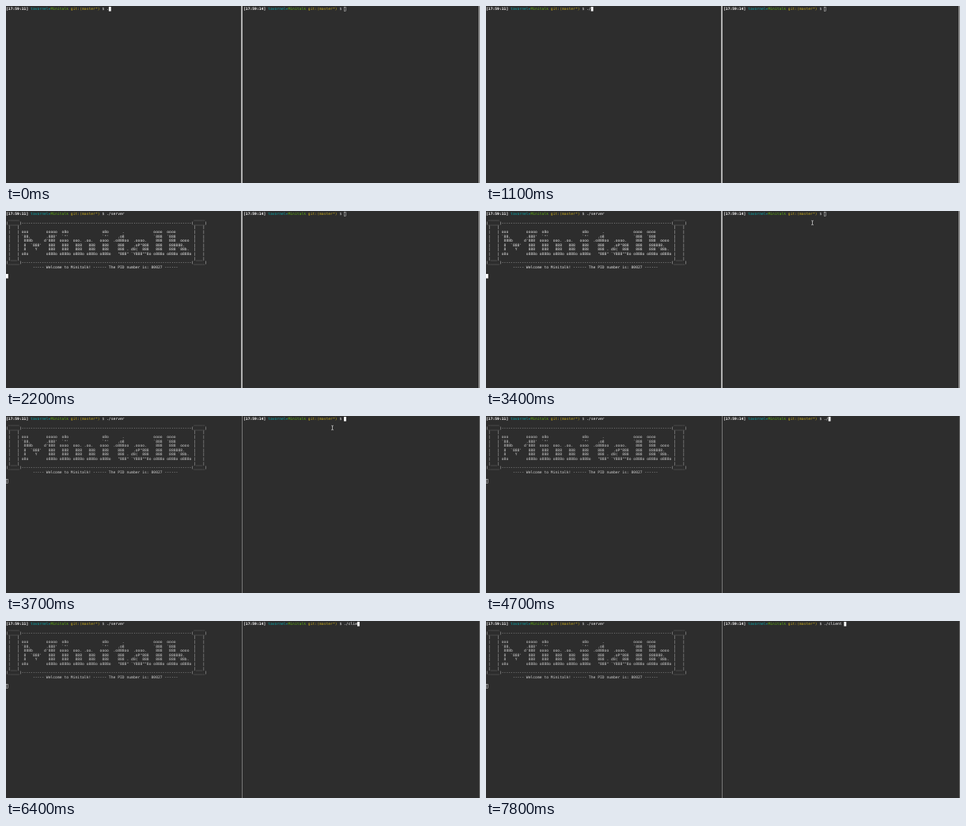
An HTML page for the animation above (8 s loop, 599 by 225 pixels).

```html
<!DOCTYPE html>
<html lang="en">
<head>
<meta charset="utf-8">
<title>Minitalk terminal</title>
<style>
  html, body { margin: 0; width: 599px; height: 225px; overflow: hidden; background: #2d2d2d; }
  body { position: relative; }
  /* Terminals are laid out at ten times their size and scaled down for exact cell widths. */
  .term {
    position: absolute; top: .9px; width: 2960px; height: 2230px;
    transform: scale(.1); transform-origin: 0 0;
    font: 46.9px/56.4px "DejaVu Sans Mono", monospace;
    text-rendering: geometricPrecision; font-variant-ligatures: none;
    color: #e4e4e4; white-space: pre;
  }
  #left { left: 0; }
  #right { left: 300px; }
  .term.idle { color: #cfcfcf; }
  pre { margin: 0; font: inherit; }
  .time { color: #fff; font-weight: bold; }
  .user { color: #0aa5a8; }
  .dir { color: #5fae10; }
  .git { color: #c4a81c; }
  .cmd { color: #fff; }
  .cursor { position: absolute; left: 0; top: 0; width: 1ch; height: 56.4px; box-sizing: border-box; }
  .cursor.on { background: #fff; }
  .cursor.hollow { border: 5px solid #d8d8d8; }
  .bar { position: absolute; top: 0; height: 225px; }
  #mid { left: 297px; width: 2px; background: #b2b2b2; }
  #edge { left: 597px; width: 2px; background: #8c8c8c; }
  #midLine { left: 297.5px; width: 1px; background: #777; }
  #edgeLine { left: 598px; width: 1px; background: #666; }
  #pointer { position: absolute; left: 0; top: 0; width: 4px; height: 7px; }
</style>
</head>
<body>
<div class="term" id="left"><div><span class="time">[17:59:11]</span> <span class="user">tavornel▸</span><span class="dir">Minitalk</span> <span class="git">git:(master*)</span> $ <span class="cmd"></span></div><pre id="banner">
ooo        ooooo  o8o               o8o      .             oooo  oooo
`88.       .888'  `"'               `"'    .o8             `888  `888
 888b     d'888  oooo  ooo. .oo.   oooo  .o888oo  .oooo.    888   888  oooo
 8  `888'   888   888   888   888   888    888    .oP"888   888   888888.
 8    Y     888   888   888   888   888    888 . d8(  888   888   888 `88b.
o8o        o888o o888o o888o o888o o888o   "888" `Y888""8o o888o o888o o888o</pre><i class="cursor"></i></div>
<div class="term" id="right"><div><span class="time">[17:59:14]</span> <span class="user">tavornel▸</span><span class="dir">Minitalk</span> <span class="git">git:(master*)</span> $ <span class="cmd"></span></div><i class="cursor"></i></div>
<div class="bar" id="midLine"></div>
<div class="bar" id="edgeLine"></div>
<div class="bar" id="mid"></div>
<div class="bar" id="edge"></div>
<svg id="pointer" viewBox="0 0 4 7"><path d="M.6 .5Q2 .5 2 1.2Q2 .5 3.4 .5M2 1.2V5.6M.6 6.3Q2 6.3 2 5.6Q2 6.3 3.4 6.3" fill="none" stroke="#e0e0e0" stroke-width=".7"/></svg>
<script>
const LOOP = 8000, PROMPT_COLS = 45, ROW = 56.4;
const START = 2200, FOCUS = 3500;
const $ = id => document.getElementById(id);

function frameBanner(art) {
  const wide = 76, gap = ' '.repeat(wide);
  const wrap = (side, line) => side + line.padEnd(wide) + side;
  const rule = wrap('(_____)', '-'.repeat(wide));
  return [
    wrap(' _____ ', gap), rule, wrap(' |   | ', gap),
    ...art.split('\n').map(line => wrap(' |   | ', line)),
    wrap(' |___| ', gap), rule,
    ' '.repeat(12) + '----- Welcome to Minitalk! ------ The PID number is: 80027 ------'
  ].join('\n');
}
const banner = $('banner');
banner.textContent = frameBanner(banner.textContent.replace(/^\n/, ''));

// Each step: start time, typed characters, cursor state, cursor row.
const panes = [
  { id: 'left', text: './server ', steps: [
    [0, 1, 'on'], [600, 1, 'off'], [1100, 2, 'on'], [1300, 3, 'on'], [1400, 4, 'on'],
    [1600, 5, 'on'], [1700, 9, 'on'], [START, 9, 'on', 14], [2700, 9, 'off', 14],
    [3300, 9, 'on', 14], [FOCUS, 9, 'hollow', 14]] },
  { id: 'right', text: './client ', steps: [
    [0, 0, 'hollow'], [FOCUS, 0, 'on'], [4100, 0, 'off'], [4300, 1, 'on'], [4700, 2, 'on'],
    [4900, 3, 'on'], [5500, 3, 'off'], [6100, 4, 'on'], [6300, 5, 'on'], [6400, 6, 'on'],
    [6500, 7, 'on'], [6600, 8, 'on'], [6700, 9, 'on'], [7200, 9, 'off'], [7800, 9, 'on']] }
];
for (const pane of panes) {
  pane.el = $(pane.id);
  pane.cmd = pane.el.querySelector('.cmd');
  pane.cursor = pane.el.querySelector('.cursor');
}

function drawPane(pane, t) {
  const step = pane.steps.findLast(s => s[0] <= t);
  if (step === pane.last) return;
  pane.last = step;
  const [, typed, state, row = 0] = step;
  pane.cmd.textContent = pane.text.slice(0, typed);
  pane.cursor.className = 'cursor ' + state;
  pane.cursor.style.left = (row ? 0 : PROMPT_COLS + typed) + 'ch';
  pane.cursor.style.top = row * ROW + 'px';
  pane.el.classList.toggle('idle', state === 'hollow');
}

function drawPointer(t) {
  const p = Math.min(1, Math.floor((t - 3100) / 100) / 3);
  const rest = (1 - p) ** 2;
  $('pointer').style.visibility = t >= 3100 && t < 4300 ? 'visible' : 'hidden';
  $('pointer').style.transform = `translate(${410.5 - 80 * rest}px, ${11.5 + 45 * rest}px)`;
}

function draw(now) {
  const t = now % LOOP;
  panes.forEach(pane => drawPane(pane, t));
  banner.style.visibility = t >= START ? 'visible' : 'hidden';
  drawPointer(t);
  const fade = Math.min(3, Math.max(0, Math.floor((t - 3400) / 100))) / 3;
  $('mid').style.opacity = $('edge').style.opacity = 1 - fade;
}

let begin;
function tick(now) {
  begin ??= now;
  draw(now - begin);
  requestAnimationFrame(tick);
}
draw(0);
requestAnimationFrame(tick);
</script>
</body>
</html>
```
